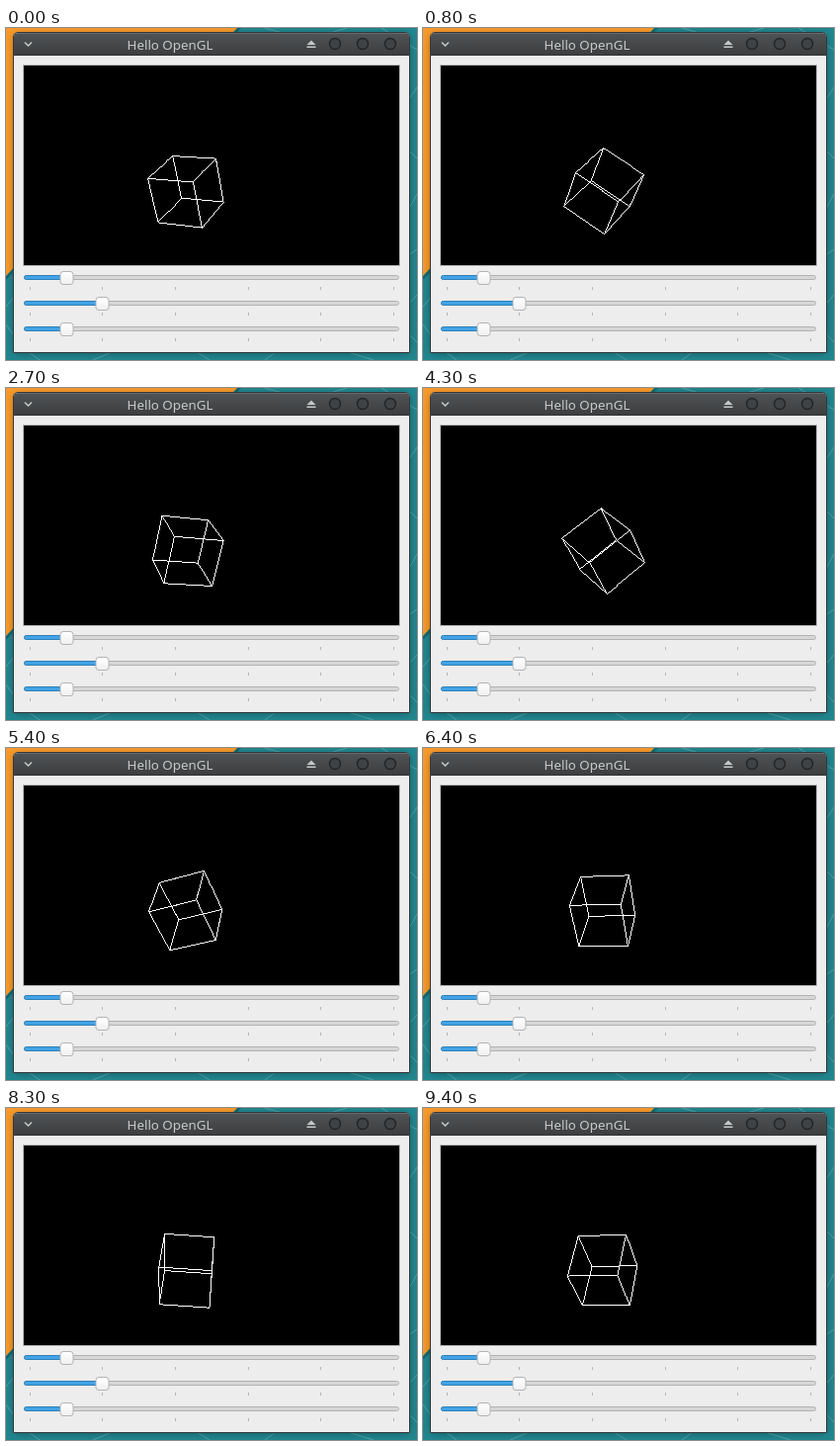
An HTML page with a canvas for the animation above (9.5 s loop, 416 by 336 pixels).

```html
<!DOCTYPE html>
<html lang="en">
<head>
<meta charset="utf-8">
<title>Hello OpenGL</title>
<style>
  html, body { margin: 0; width: 100%; height: 100%; overflow: hidden; }
  svg, canvas { position: absolute; left: 0; top: 0; }
  canvas { left: 18px; top: 38px; }
</style>
</head>
<body>
<svg width="416" height="336" viewBox="0 0 416 336">
  <defs>
    <linearGradient id="bar" x2="0" y2="1">
      <stop offset="0" stop-color="#505355"/>
      <stop offset="1" stop-color="#3b3d3f"/>
    </linearGradient>
    <linearGradient id="knob" x2="0" y2="1">
      <stop offset="0" stop-color="#fff"/>
      <stop offset="1" stop-color="#f0f0f0"/>
    </linearGradient>
    <filter id="soft" x="-10%" y="-10%" width="120%" height="120%">
      <feGaussianBlur stdDeviation="4"/>
    </filter>
  </defs>

  <!-- wallpaper -->
  <rect width="416" height="336" fill="#22868f"/>
  <path d="M0 0H238L0 255Z" fill="#126a74"/>
  <path d="M0 0H234L0 251Z" fill="#f79a2b"/>
  <path d="M262 0L290 8M318 8L345 0M380 0L416 22M416 60L404 78M404 120L416 132M416 168L404 190M404 232L416 224M416 270L404 284M404 306L416 318M0 282L10 270M0 300L10 314M20 326L34 336M88 336L112 326M190 326L206 336M262 336L276 326M340 326L372 336"
        fill="none" stroke="#5fa9ae" stroke-width=".8"/>
  <rect x="8" y="7" width="400" height="322" rx="4" opacity=".35" filter="url(#soft)"/>

  <!-- window -->
  <path d="M7.5 328.5V9a4.500 4.500 0 0 1 4.500-4.500H404a4.500 4.500 0 0 1 4.500 4.500V328.500Z" fill="#eeeded" stroke="#35383a"/>
  <path d="M8 28V9a4 4 0 0 1 4-4H404a4 4 0 0 1 4 4V28Z" fill="url(#bar)"/>
  <path d="M11 5.500H405" stroke="#66696b"/>
  <path d="M8 27.500H408" stroke="#333537"/>
  <text x="166" y="22" text-anchor="middle" fill="#c6c9ca" font-size="13.33" font-family="'Noto Sans', sans-serif">Hello OpenGL</text>
  <path d="M19 14.500L22.500 18L26 14.500" fill="none" stroke="#c6c9ca" stroke-width="1.500"/>
  <path d="M304.500 17L309 12.500L313.500 17ZM304.500 18.500h9v1.500h-9Z" fill="#c6c9ca"/>
  <g fill="#404345" stroke="#222426" stroke-width="1.400">
    <circle cx="333" cy="16" r="5.500"/>
    <circle cx="361" cy="16" r="5.500"/>
    <circle cx="389" cy="16" r="5.500"/>
  </g>
  <rect x="17.500" y="37.500" width="381" height="203" fill="#000" stroke="#b9b8b8"/>
  <g id="sliders"></g>
</svg>
<canvas width="380" height="202"></canvas>
<script>
const slider = (x, y) => `
  <rect x="18.500" y="${y - 2}" width="379" height="4" rx="2" fill="#d8d7d7" stroke="#b3b2b2"/>
  <rect x="18.500" y="${y - 2}" width="${x - 18}" height="4" rx="2" fill="#42a4e4" stroke="#2f7fb8"/>
  <path d="${[24, 97, 171, 245, 318, 392].map(t => `M${t + .5} ${y + 9.5}v3`).join('')}" stroke="#b5b4b4"/>
  <rect x="${x - 6}" y="${y - 6}" width="13" height="13" rx="3" fill="url(#knob)" stroke="#b4b3b3"/>`;
document.getElementById('sliders').innerHTML =
  slider(61, 252.5) + slider(97, 278.5) + slider(61, 304.5);

const ctx = document.querySelector('canvas').getContext('2d');
const STEP = 100, STEPS = 95;
const HALF = 25.3, DEPTH = 615;
const VIEW = [189.9, 101], CENTER = [-25.3, -25.1];

// Step and x angle in degrees; the timer drifts slightly around 5 degrees per step.
const DRIFT = [[0, 29.8], [17, 115.1], [27, 166.5], [43, 246.9], [54, 301.7], [73, 396.9], [94, 499.1]];

function angleAt(step) {
  const i = Math.max(1, DRIFT.findIndex(([s]) => s >= step));
  const [s0, a0] = DRIFT[i - 1], [s1, a1] = DRIFT[i];
  return a0 + (a1 - a0) * (step - s0) / (s1 - s0);
}

function turn(a, b, degrees) {
  const r = degrees * Math.PI / 180, c = Math.cos(r), s = Math.sin(r);
  return [a * c - b * s, a * s + b * c];
}

function project(corner, angle) {
  let [x, y, z] = [1, 2, 4].map(bit => corner & bit ? HALF : -HALF);
  [x, y] = turn(x, y, angle - 40);
  [z, x] = turn(z, x, 2 * angle + 95);
  [y, z] = turn(y, z, angle);
  const k = DEPTH / (DEPTH - z);
  return [VIEW[0] + (CENTER[0] + x) * k, VIEW[1] - (CENTER[1] + y) * k];
}

// One-pixel line without smoothing
function line([x0, y0], [x1, y1]) {
  const n = Math.ceil(Math.max(Math.abs(x1 - x0), Math.abs(y1 - y0)));
  for (let i = 0; i <= n; i++) {
    ctx.fillRect(Math.round(x0 + (x1 - x0) * i / n), Math.round(y0 + (y1 - y0) * i / n), 1, 1);
  }
}

function draw() {
  const angle = angleAt(Math.floor(performance.now() / STEP) % STEPS);
  const points = [...Array(8).keys()].map(corner => project(corner, angle));
  ctx.fillStyle = '#000';
  ctx.fillRect(0, 0, 380, 202);
  ctx.fillStyle = '#fff';
  for (let i = 0; i < 8; i++) {
    for (const bit of [1, 2, 4]) if (!(i & bit)) line(points[i], points[i | bit]);
  }
  requestAnimationFrame(draw);
}
draw();
</script>
</body>
</html>
```
